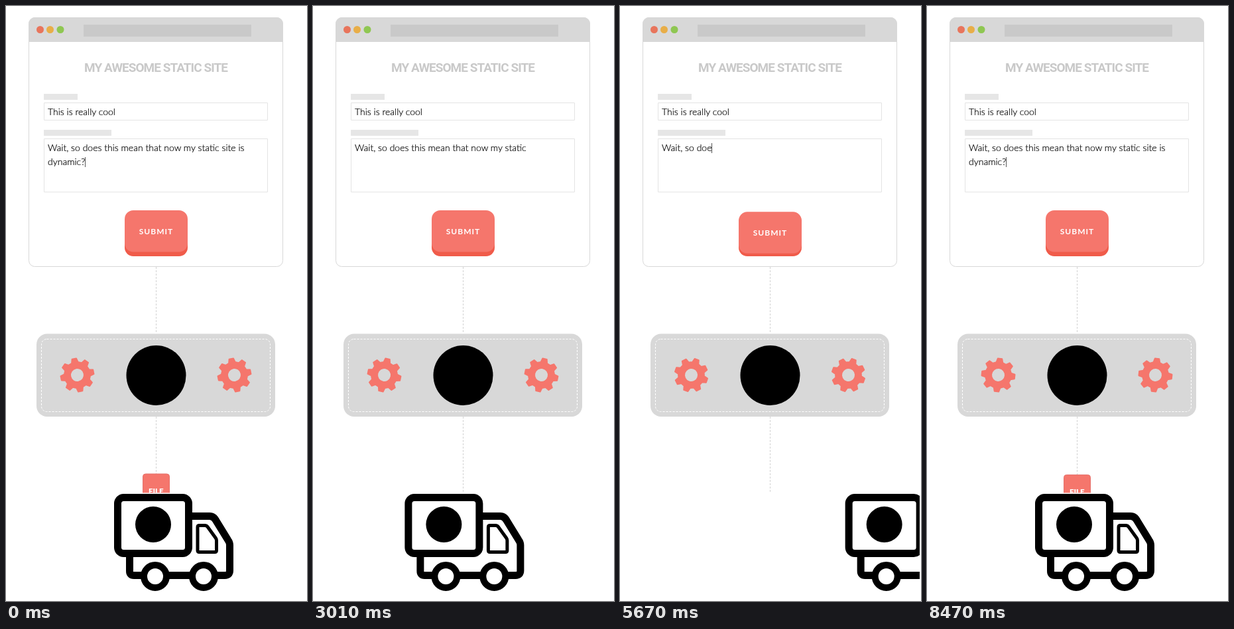
An HTML page that plays this animation: 454 px wide and 894 px high, repeating every 8.54 s.

```html
<!DOCTYPE html>
<html lang="en">
<head>
<meta charset="utf-8">
<title>Static site form</title>
<style>
  html, body { margin: 0; width: 100%; height: 100%; overflow: hidden; background: #fff; }
  svg { position: absolute; left: 0; top: 0; display: block; }
  text { text-anchor: middle; font-family: Lato, sans-serif; font-weight: 900; }
  #title { font: 600 20px "Liberation Sans Narrow", Roboto, "Open Sans", sans-serif; font-stretch: 62.5%; letter-spacing: -.05em; fill: #c9c9c9; }
  .field { position: absolute; left: 63px; width: 330px; font: 300 14px/21px Lato, sans-serif; color: #000; -webkit-text-stroke: .2px #000; white-space: pre-wrap; }
  #caret { display: inline-block; width: 0; height: 15px; margin-right: -1px; border-left: 1px solid #555; vertical-align: -3px; }
</style>
</head>
<body>
<svg width="454" height="894" viewBox="0 0 454 894">
  <defs>
    <clipPath id="stage"><rect width="452" height="894"/></clipPath>
    <clipPath id="aboveTruck"><rect width="454" height="731.5"/></clipPath>
    <path id="gear" fill="#f5766c" fill-rule="evenodd" stroke="#f5766c" stroke-width="2" stroke-linejoin="round"/>
  </defs>

  <path d="M226.5 392V492M226.5 617V731" stroke="#d2d2d2" stroke-dasharray="3 2"/>

  <g id="post">
    <rect x="207" y="1" width="39" height="39" rx="4" fill="#fff" stroke="#dd7973" stroke-width="2"/>
    <text x="226" y="14" font-size="11" fill="#dd7973">POST</text>
  </g>
  <g clip-path="url(#aboveTruck)">
    <g id="file">
      <rect x="206.5" y=".5" width="40" height="40" rx="4" fill="#f5766c" stroke="#e5706a"/>
      <text x="226.3" y="30" font-size="11.5" fill="#fff">FILE</text>
    </g>
  </g>

  <!-- browser window -->
  <rect x="34.5" y="17.5" width="383" height="374" rx="9" fill="#fff" stroke="#d8d8d8"/>
  <path d="M34 54V27a10 10 0 0 1 10-10H408a10 10 0 0 1 10 10V54z" fill="#d8d8d8"/>
  <circle cx="51.5" cy="35.5" r="5.5" fill="#e8755c"/>
  <circle cx="66.5" cy="35.5" r="5.5" fill="#e8ae48"/>
  <circle cx="82" cy="35.5" r="5.5" fill="#8fc752"/>
  <path d="M117 28H370V46H117z" fill="#c9c9c9"/>
  <text id="title" x="226">MY AWESOME STATIC SITE</text>
  <path d="M57 132H108V141H57zM57 186H159V195H57z" fill="#e6e6e6"/>
  <path d="M57.5 145.5H394.5V171.5H57.5zM57.5 199.5H394.5V279.5H57.5z" fill="#fff" stroke="#e4e4e4"/>
  <rect x="179" y="318" width="95" height="58" rx="13" fill="#f05b4a"/>
  <g id="button">
    <rect x="179" y="307" width="95" height="62.5" rx="13" fill="#f5766c"/>
    <text x="226.5" y="343" font-size="12" letter-spacing="1" fill="#fff" style="font-weight:700">SUBMIT</text>
  </g>

  <!-- processing panel -->
  <rect x="46" y="492.5" width="360" height="124.5" rx="16" fill="#d8d8d8"/>
  <rect x="53.5" y="500.5" width="345" height="109" rx="8" fill="none" stroke="#fff" stroke-dasharray="3 2"/>
  <use href="#gear" class="wheel"/>
  <use href="#gear" class="wheel"/>
  <circle cx="226.5" cy="555" r="45"/>

  <!-- truck -->
  <g clip-path="url(#stage)">
    <g id="truck" fill="#fff" stroke="#000" stroke-width="11">
      <path d="M186.5 824V849q0 6.5 6.5 6.5H330q7.5 0 7.5-7.5V810q0-4-3-8L316 772q-3-5.500-9-5.500H276"/>
      <rect x="168.500" y="738.500" width="107" height="84" rx="9"/>
      <path d="M291.5 780.5H300q2.5 0 4 2L316 799q1.500 2 1.500 4V818q0 2.500-2.500 2.500H291.500q-2.500 0-2.500-2.500V783q0-2.500 2.500-2.500z" stroke-width="5"/>
      <circle cx="225" cy="857" r="17" stroke-width="10"/>
      <circle cx="298" cy="857" r="17" stroke-width="10"/>
      <circle cx="222" cy="779" r="27" fill="#000" stroke="none"/>
    </g>
  </g>
</svg>
<div class="field" style="top:148px">This is really cool</div>
<div class="field" style="top:202px"><span id="typed"></span><span id="caret"></span></div>

<script>
const LOOP = 8540, STEP = 70, CYCLE = 4186, CLICK = 1383;
const MESSAGE = "Wait, so does this mean that now my static site is dynamic?";
const TYPE_AT = 816, TYPE_MS = 52, ERASE_AT = 230;
const $ = id => document.getElementById(id);
const wheels = document.querySelectorAll(".wheel");

// Standard CSS "ease" curve: cubic-bezier(.25, .1, .25, 1)
function ease(x) {
  if (x <= 0) return 0;
  if (x >= 1) return 1;
  const bez = (a, b, s) => 3 * a * s * (1 - s) ** 2 + 3 * b * s * s * (1 - s) + s ** 3;
  let lo = 0, hi = 1;
  for (let i = 0; i < 20; i++) {
    const mid = (lo + hi) / 2;
    if (bez(.25, .25, mid) < x) lo = mid; else hi = mid;
  }
  return bez(.1, 1, lo);
}

const tween = (u, start, end, from, to) => from + (to - from) * ease((u - start) / (end - start));

// Eight tapered teeth around a round hole
function gearPath() {
  const points = [];
  for (let i = 0; i < 8; i++)
    for (const [da, r] of [[-.25, 19.5], [-.13, 25], [.13, 25], [.25, 19.5]]) {
      const a = i * Math.PI / 4 + da;
      points.push((r * Math.cos(a)).toFixed(2) + " " + (r * Math.sin(a)).toFixed(2));
    }
  return "M" + points.join("L") + "zM10.5 0A10.5 10.5 0 1 0-10.5 0A10.5 10.5 0 1 0 10.5 0z";
}

function typedCount(t) {
  const local = t % CYCLE, full = MESSAGE.length;
  if (local >= TYPE_AT) return Math.min(full, Math.floor((local - TYPE_AT) / TYPE_MS));
  const erased = Math.max(0, (local - ERASE_AT) / (TYPE_AT - ERASE_AT));
  return Math.ceil(full * (1 - erased));
}

const move = (id, x, y) => $(id).setAttribute("transform", `translate(${x.toFixed(2)} ${y.toFixed(2)})`);

function draw(t) {
  const u = ((t - CLICK) / CYCLE + 1) % 1;

  move("button", 0, u < .05 ? tween(u, 0, .05, 0, 3) : tween(u, .05, .1, 3, 0));
  move("post", 0, tween(u, 0, .15, 299, 529));
  move("file", 0, u < .7 ? tween(u, .48, .7, 572, 704) : tween(u, .7, .8, 704, 735));
  move("truck", u < .1 ? tween(u, 0, .1, 0, 454) : tween(u, .114, .5, -454, 0), 0);

  // Two turns per cycle
  const angle = 34 + 720 * t / CYCLE;
  wheels.forEach((wheel, i) =>
    wheel.setAttribute("transform", `translate(${107.5 + 237 * i} 554.5) rotate(${angle})`));

  $("typed").textContent = MESSAGE.slice(0, typedCount(t));
  $("caret").style.visibility = t % 1046 < 470 ? "visible" : "hidden";
}

$("gear").setAttribute("d", gearPath());

// Pick the heading size that suits whichever face is available.
const title = $("title");
const titleSize = 20 * 216 / title.getComputedTextLength();
title.style.fontSize = titleSize + "px";
title.setAttribute("y", 92.5 + .36 * titleSize);

const begin = performance.now();
function frame() {
  const t = (performance.now() - begin) % LOOP;
  draw(Math.floor(t / STEP) * STEP);
  requestAnimationFrame(frame);
}
frame();
</script>
</body>
</html>
```
